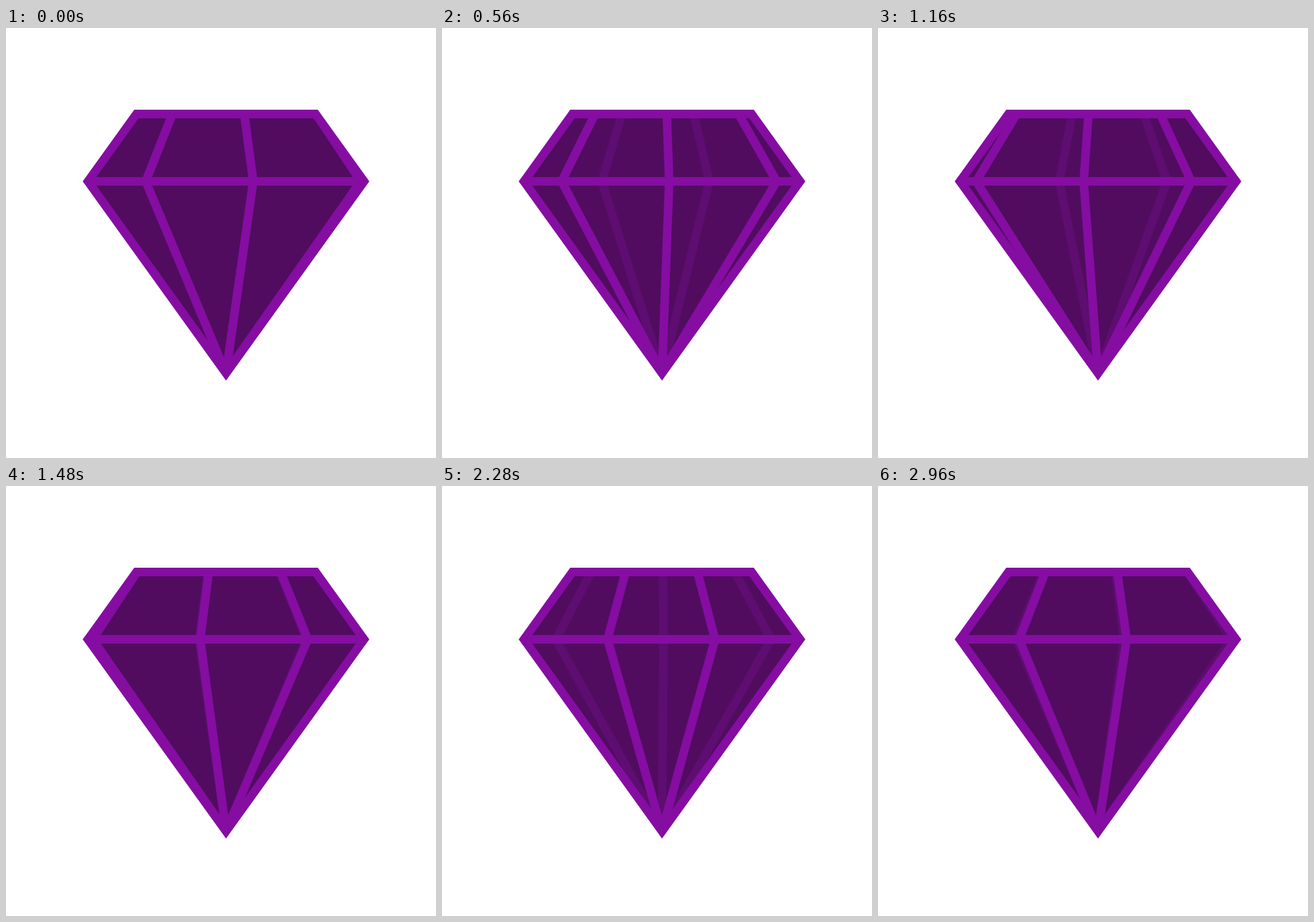
Recreate the animation shown at these times as an HTML page. Size 600 by 600 pixels, loop 3000 ms.

```html
<!DOCTYPE html>
<html lang="en">
<head>
<meta charset="utf-8">
<title>Turning gem</title>
<style>
  html, body { margin: 0; width: 100%; height: 100%; overflow: hidden; background: #fff; }
  svg { display: block; width: 100vw; height: 100vh; }
  .body { fill: #510c60; }
  .line { fill: none; stroke: #850da2; stroke-width: 12; stroke-miterlimit: 10; }
  .back { stroke: #5e0d70; }
  .edges { animation: 3s steps(75) infinite; }
  .front { animation-name: left; }
  .back { animation-name: right; }

  /* Three edges, each moving by one facet per loop */
  @keyframes left {
    from { d: path("M232.2 120L195 214L307 481.7M332.4 120L345 214L307 481.7M432.6 120L495 214L307 481.7"); }
    to   { d: path("M132 120L45 214L307 481.7M232.2 120L195 214L307 481.7M332.4 120L345 214L307 481.7"); }
  }
  @keyframes right {
    from { d: path("M132 120L45 214L307 481.7M232.2 120L195 214L307 481.7M332.4 120L345 214L307 481.7"); }
    to   { d: path("M232.2 120L195 214L307 481.7M332.4 120L345 214L307 481.7M432.6 120L495 214L307 481.7"); }
  }
</style>
</head>
<body>
<svg viewBox="0 0 600 600">
  <defs>
    <path id="gem" d="M182 120H432L499.6 214L307 481.7L114.4 214Z"/>
    <clipPath id="inside"><use href="#gem"/></clipPath>
  </defs>
  <use href="#gem" class="body"/>
  <g clip-path="url(#inside)">
    <path class="line edges back" d="M0 0"/>
    <path class="line edges front" d="M0 0"/>
  </g>
  <path class="line" d="M114.4 214H499.6"/>
  <use href="#gem" class="line"/>
</svg>
</body>
</html>
```
